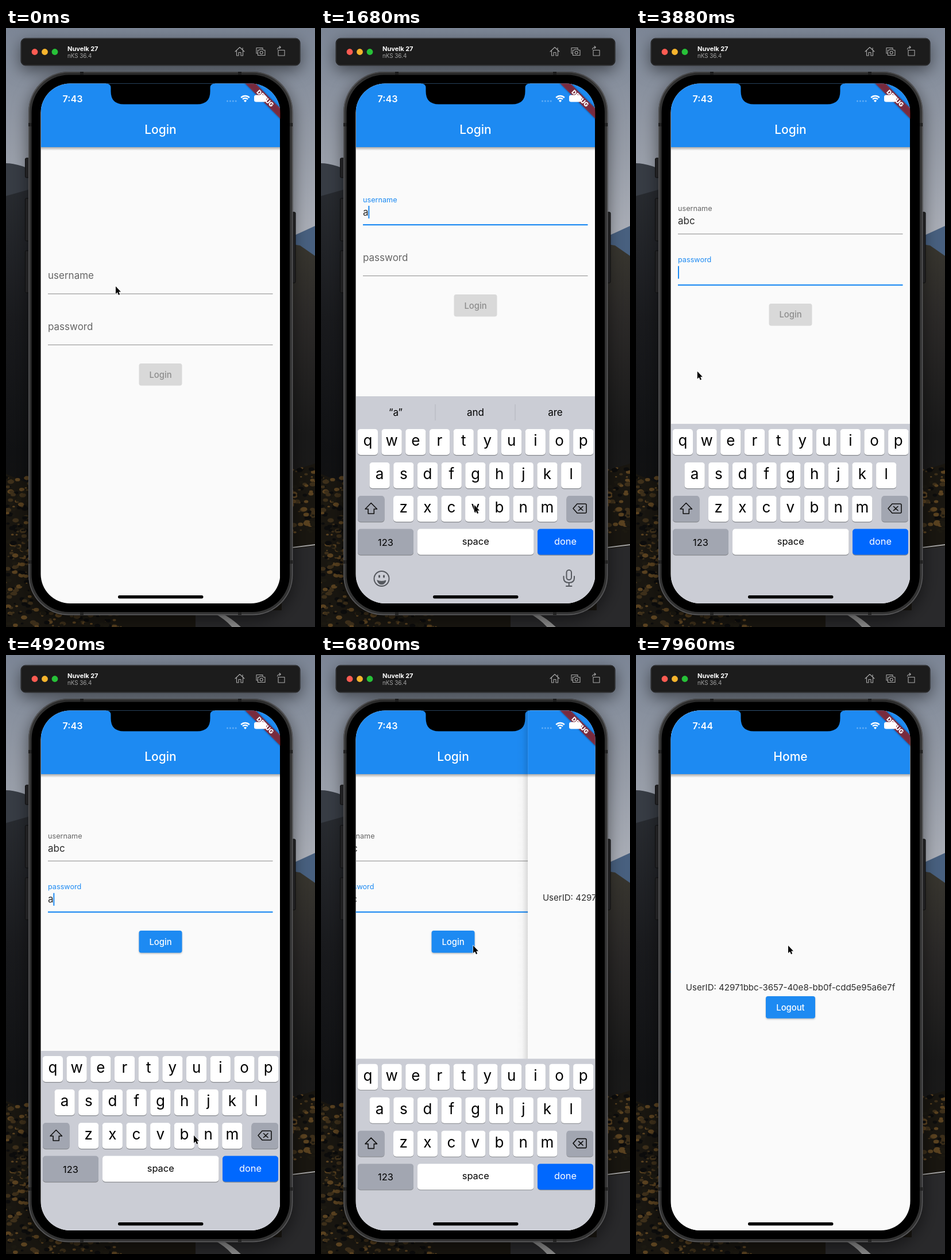
An HTML page that plays this animation: 538 px wide and 1041 px high, repeating every 8 s.

```html
<!DOCTYPE html>
<html lang="en">
<head>
<meta charset="utf-8">
<title>Login flow</title>
<style>
  html, body { margin: 0; width: 100%; height: 100%; overflow: hidden; background: #111; }
  svg { display: block; font-family: Inter, sans-serif; }
  .mid { text-anchor: middle; }
  .line { fill: none; stroke-linecap: round; stroke-linejoin: round; }
  .title { font-size: 21px; font-weight: 500; fill: #fff; }
  .btn { font-size: 14.8px; font-weight: 500; fill: #fff; }
  .key { font-size: 26px; }
  .small { font-size: 16.4px; }
  .body { font-size: 17px; fill: #2b2b2b; }
</style>
</head>
<body>
<svg id="stage" width="538" height="1041" viewBox="0 0 538 1041"></svg>
<script>
const BLUE = '#1d8af2', GREY = '#a2a6b1', LOOP = 8000;
const TAP_USER = 176, TAP_PASS = 3400, PUSH = 6758, KB_CLOSE = 6783;
const userTyping = [[1300, 'a'], [2000, 'ab'], [2560, 'abc']];
const passTyping = [[4500, 'a'], [5180, '•b'], [5840, '••c']];
const hints = [["I", "I’m", "we"], ["“a”", "and", "are"], ["“ab”", "about", "above"], ["“abc”", "ancient", "anchor"]];
// time, x, y of the pointer tip
const pointerPath = [
  [0, 191, 449], [400, 189, 449], [750, 189, 449], [1150, 104, 772], [1380, 104, 772],
  [1680, 267, 829], [1900, 307, 833], [2080, 307, 833], [2420, 230, 833], [2620, 230, 833],
  [3040, 78, 467], [3250, 110, 398], [3480, 110, 398], [4250, 104, 772], [4600, 104, 772],
  [4920, 327, 835], [5050, 310, 834], [5260, 310, 834], [5640, 230, 833], [5900, 230, 833],
  [6300, 265, 505], [LOOP, 265, 505]
];

const rect = (x, y, w, h, r, fill, extra = '') =>
  `<rect x="${x}" y="${y}" width="${w}" height="${h}" rx="${r}" fill="${fill}" ${extra}/>`;
const text = (x, y, cls, str, extra = '') => `<text x="${x}" y="${y}" class="${cls}" ${extra}>${str}</text>`;
const path = (d, extra) => `<path d="${d}" ${extra}/>`;
const fade = (id, stops, dir = 'x2="0" y2="1"') => `<linearGradient id="${id}" ${dir}>` +
  stops.map(([o, c, a = 1]) => `<stop offset="${o}" stop-color="${c}" stop-opacity="${a}"/>`).join('') + '</linearGradient>';

const key = (x, y, w, label, cls = 'key', fill = '#fff', ink = '#000', dy = 29) =>
  rect(x, y + 1.2, w, 45, 5, '#888a8f') + rect(x, y, w, 45, 5, fill) +
  text(x + w / 2, y + dy, cls + ' mid', label, `fill="${ink}"`);
const keyRow = (letters, x, y) => [...letters].map((c, i) => key(x + i * 41.7, y, 35.2, c)).join('');

const appBar = title => rect(61, 207, 416, 6, 0, 'url(#barShade)') + rect(61, 96, 416, 111, 0, BLUE) +
  text(269, 184, 'title mid', title);
const button = (id, x, y, w, label) => `<g id="${id}">` +
  rect(x, y + 1.5, w, 38.5, 4, '#000', 'opacity=".25" filter="url(#soft)"') +
  rect(x, y, w, 38.5, 4, BLUE) + text(x + w / 2, y + 24.5, 'btn mid', label) + '</g>';
const field = (id, y, label) => `<g id="${id}" transform="translate(73 ${y})">
  <text class="label" font-size="17">${label}</text><text class="body value" y="-16.5"></text>
  <rect class="rule" width="391.5"/><rect class="caret" y="-33" width="2" height="22" fill="${BLUE}"/></g>`;

let seed = 7;
const random = () => (seed = seed * 16807 % 2147483647) / 2147483647;
const shrubs = (count, x, y, w, h) => Array.from({ length: count }, () => {
  const size = 1 + random() * 3, tone = ['#3d2f1a', '#0c0c0c', '#5a4220', '#1c1911'][random() * 4 | 0];
  return `<ellipse cx="${x + random() * w}" cy="${y + random() * h}" rx="${size * 1.5}" ry="${size}" fill="${tone}"/>`;
}).join('');

const backdrop = () => rect(0, 0, 538, 1041, 0, 'url(#sky)') +
  path('M538 344L490 366V460H538Z', 'fill="#48607f"') +
  path('M0 235Q24 235 60 254V800H0Z', 'fill="#373c44"') +
  path('M0 292L60 275V1041H0Z', 'fill="url(#hill)"') +
  path('M480 372L512 378L538 396V1041H480Z', 'fill="url(#slope)"') +
  path('M0 775L60 800L480 775L538 757V1041H0Z', 'fill="#191610"') +
  shrubs(170, 0, 780, 46, 220) + shrubs(80, 495, 765, 43, 115) + shrubs(110, 0, 1000, 200, 41) +
  path('M480 908L538 900V1041H330V1012H480Z', 'fill="#29292b"') +
  path('M490 904L538 898', 'stroke="#a5a5a5" stroke-width="2"') +
  path('M348 1010Q380 1024 396 1044H412Q390 1022 364 1012Z', 'fill="#909090"');

const toolbar = () => rect(26, 18, 486, 47, 8, '#1d1d1e', 'stroke="#111" filter="url(#cast)"') +
  rect(26.5, 18.5, 485, 46, 7.5, 'none', 'stroke="#3a3a3b" stroke-width=".8"') +
  ['#fc5b52', '#f6b42d', '#27c138'].map((c, i) => `<circle cx="${50 + i * 17.5}" cy="41.5" r="5.4" fill="${c}"/>`).join('') +
  text(107, 39.5, '', 'Nuvelk 27', 'font-size="11" font-weight="700" fill="#fff"') +
  text(107, 52, '', 'nKS 36.4', 'font-size="9.8" fill="#a4a4a4"') +
  `<g class="line" stroke="#a9a9a9" stroke-width="1.1">
    <path d="M399 41L407 33.5L415 41M401.5 39.5V48H405V42.5H409V48H412.5V39.5M412 37.5V34.5"/>
    <path d="M438 44H436V34.5H447V36M438.5 38.5H441L442 37H447L448 38.5H451V47.5H438.5Z"/><circle cx="444.7" cy="42.8" r="2.5"/>
    <path d="M474 38.5H485V48H474ZM472.5 37Q473 33.5 478 33.5M476 31.5L478.3 33.5L476 35.5"/></g>`;

const phone = () => [[226, 34], [296, 74], [387, 73]].map(([y, h]) => rect(33.5, y, 8, h, 2, '#29292b', 'stroke="#111"')).join('') +
  rect(496, 320, 8, 123, 2, '#29292b', 'stroke="#111"') +
  rect(39, 76, 460.5, 944.5, 70, '#313133', 'filter="url(#cast)"') +
  rect(40, 77, 458.5, 942.5, 69, 'none', 'stroke="#5a5a5c" stroke-width="1.4"') +
  [[129, 76], [404, 76], [129, 1014], [404, 1014], [39, 165], [493, 165], [39, 925], [493, 925]]
    .map(([x, y]) => rect(x, y, 6, 6, 0, '#222')).join('') +
  rect(44.5, 81.5, 449.5, 933.5, 65, '#000');

const banner = () => `<g transform="translate(477 96.5) rotate(45)">` +
  rect(-60, 30, 120, 12.8, 0, '#000', 'opacity=".5" filter="url(#soft)"') +
  rect(-60, 30, 120, 12.8, 0, '#b71c1c', 'opacity=".63"') +
  text(0, 40.3, 'mid', 'DEBUG', 'font-size="10.6" font-weight="900" fill="#fff"') + '</g>';

const status = () => text(98.5, 129, '', '7:43', 'id="clock" font-size="16.2" font-weight="600" fill="#fff"') +
  [0, 1, 2, 3].map(i => `<circle cx="${385.5 + i * 4.9}" cy="127" r="1.5" fill="#fff" opacity=".3"/>`).join('') +
  path('M409.2 121A10.3 10.3 0 0 1 423.8 121M412.1 123.9A6.2 6.2 0 0 1 420.9 123.9', 'fill="none" stroke="#fff" stroke-width="2.5"') +
  path('M416.5 129l-2.6-2.6a3.6 3.6 0 0 1 5.2 0z', 'fill="#fff"') +
  rect(432, 116.5, 21, 12, 3.5, '#fff') + rect(454, 120.5, 1.6, 4.5, .8, '#fff', 'opacity=".6"');

const keyboard = () => `<rect id="kbBack" x="61" width="416" height="400" fill="#cbcdd5"/><g id="kb"><g id="hints">` +
  rect(198.5, 654, 1, 28, 0, '#b3b6bd') + rect(337.5, 654, 1, 28, 0, '#b3b6bd') +
  [130, 269, 408].map(x => text(x, 674, 'mid hint', '', 'font-size="17"')).join('') +
  `<g class="line" stroke="#55585e" stroke-width="2"><circle cx="105.5" cy="957" r="13"/>
    <path d="M98 960Q105.5 963 113 960Q111.5 967 105.5 967Q99.5 967 98 960Z" fill="#55585e" stroke-width="1"/>
    <path d="M101.5 952V954M109.5 952V954" stroke-width="3"/>
    <rect x="427.5" y="942" width="8.5" height="17" rx="4.25"/><path d="M422.5 953V956Q422.5 964 431.75 964T441 956V953M431.75 964V970M427 970H436.5"/></g></g>` +
  keyRow('qwertyuiop', 63.8, 697) + keyRow('asdfghjkl', 84.5, 755) + keyRow('zxcvbnm', 126, 813) +
  key(64, 813, 46.5, '', 'key', GREY) + key(427.5, 813, 46.5, '', 'key', GREY) +
  key(64, 870.5, 97, '123', 'small', GREY) + key(168, 870.5, 202.5, 'space', 'small', '#fff', '#000', 27) +
  key(377, 870.5, 97, 'done', 'small', '#0068fe', '#fff', 27) +
  `<g class="line" stroke="#111" stroke-width="1.6"><path d="M87.2 825.5L97.5 836H92.3V844H82.1V836H77Z"/>
    <path d="M446 827H460Q462 827 462 829V841Q462 843 460 843H446L439 835ZM448.5 831.5L456 838.5M456 831.5L448.5 838.5"/></g></g>`;

const stage = document.getElementById('stage');
stage.innerHTML = `<defs>
  ${fade('sky', [[0, '#7c8696'], [.2, '#969ca7'], [.34, '#a9adb6']])}
  ${fade('hill', [[0, '#282b30'], [.3, '#191a1d'], [.6, '#101113'], [1, '#14120e']])}
  ${fade('slope', [[0, '#38362f'], [.2, '#2b2928'], [.5, '#191919'], [1, '#1c1a18']])}
  ${fade('barShade', [[0, '#000', .32], [1, '#000', 0]])}
  ${fade('edgeShade', [[0, '#000', 0], [.5, '#000', .02], [1, '#000', .13]], 'x2="1" y2="0"')}
  <filter id="soft" x="-20%" y="-50%" width="140%" height="200%"><feGaussianBlur stdDeviation="1.8"/></filter>
  <filter id="cast" x="-20%" y="-60%" width="140%" height="260%"><feDropShadow dx="0" dy="8" stdDeviation="14" flood-opacity=".5"/></filter>
  <clipPath id="screen">${rect(60.5, 96.5, 417, 903.5, 51, '#000')}</clipPath></defs>
  ${backdrop()}${phone()}${toolbar()}
  <g clip-path="url(#screen)">
    <g id="login">${rect(60, 96, 417, 904, 0, '#fafafa')}${appBar('Login')}
      <g id="form">${field('user', 462, 'username')}${field('pass', 550.7, 'password')}${button('submit', 231.5, 583, 75, 'Login')}</g></g>
    <g id="home">${rect(41, 96, 20, 904, 0, 'url(#edgeShade)')}${rect(61, 96, 417, 904, 0, '#fafafa')}${appBar('Home')}
      <g id="info">${text(269, 582.5, 'mid', 'UserID: 42971bbc-3657-40e8-bb0f-cdd5e95a6e7f', 'font-size="15.06" fill="#2b2b2b"')}
      ${button('logout', 226, 593, 86, 'Logout')}</g></g>
    ${banner()}${status()}${keyboard()}
    ${path('M174 90V96.5Q182.5 96.5 182.5 104V110Q182.5 132.5 205 132.5H333Q355.5 132.5 355.5 110V104Q355.5 96.5 364 96.5V90Z', 'fill="#000"')}
    ${rect(195, 986, 148.5, 5.4, 2.7, '#000')}
  </g>
  <g id="pointer">${path('M0 0V13L3 10.3L5 15L7.2 14L5.2 9.6H9Z', 'fill="#000" stroke="#fff" stroke-width="1.2" paint-order="stroke"')}</g>`;

const $ = id => document.getElementById(id);
const clamp = v => Math.min(1, Math.max(0, v));
const smooth = v => v * v * (3 - 2 * v);
const ramp = (t, start, span) => smooth(clamp((t - start) / span));
const mix = (a, b, k) => a + (b - a) * k;
const spring = (t, start) => { const x = Math.max(0, t - start) * .0183; return 1 - (1 + x) * Math.exp(-x); };
const move = (el, x, y) => el.setAttribute('transform', `translate(${x} ${y})`);
const show = (el, on) => el.style.display = on ? '' : 'none';

// Ease-out curve of the page push: cubic-bezier(.35, .91, .33, .97)
function pushEase(v) {
  const bezier = (s, a, b) => 3 * a * s * (1 - s) ** 2 + 3 * b * s * s * (1 - s) + s ** 3;
  let lo = 0, hi = 1;
  for (let i = 0; i < 24; i++) {
    const s = (lo + hi) / 2;
    if (bezier(s, .35, .33) < v) lo = s; else hi = s;
  }
  return bezier(lo, .91, .97);
}

function drawField(id, t, typing, tap, blur) {
  const el = $(id), part = c => el.querySelector('.' + c);
  const typed = typing.filter(([at]) => at <= t).pop();
  const focused = t >= tap && t < blur, float = ramp(t, tap, 200);
  part('label').setAttribute('transform', `translate(0 ${mix(-26, -39.5, float)}) scale(${mix(1, .745, float)})`);
  part('label').setAttribute('fill', focused ? BLUE : '#666');
  part('value').textContent = typed ? typed[1] : '';
  const rule = part('rule'), thick = focused ? 2.2 : 1.1;
  rule.setAttribute('y', -thick / 2);
  rule.setAttribute('height', thick);
  rule.setAttribute('fill', focused ? BLUE : '#939393');
  part('caret').setAttribute('x', typed ? part('value').getComputedTextLength() - .2 : 0);
  show(part('caret'), focused && (t - (typed ? typed[0] : tap)) % 1000 < 500);
}

function draw(t) {
  const raised = 360 * spring(t, TAP_USER) - 48 * spring(t, TAP_PASS);
  const kbHeight = raised - 312 * spring(t, KB_CLOSE);
  const inset = raised - 312 * spring(t, KB_CLOSE + 19);
  const secure = t >= TAP_PASS;

  $('kbBack').setAttribute('y', 1000 - kbHeight);
  move($('kb'), 0, Math.max(0, (secure ? 312 : 360) - kbHeight));
  show($('hints'), !secure);
  const words = hints[userTyping.filter(([at]) => at <= t).length];
  document.querySelectorAll('.hint').forEach((el, i) => el.textContent = words[i]);

  drawField('user', t, userTyping, TAP_USER, TAP_PASS);
  drawField('pass', t, passTyping, TAP_PASS, LOOP);
  move($('form'), 0, -inset / 3);
  move($('info'), 0, -inset / 2);

  const [shade, face, label] = $('submit').children, enabled = t >= passTyping[0][0];
  show(shade, enabled);
  face.setAttribute('fill', enabled ? BLUE : '#d9d9d9');
  label.style.fill = enabled ? '#fff' : '#8c8c8c';

  const push = pushEase(clamp((t - PUSH) / 400));
  move($('login'), -416 / 3 * push, 0);
  move($('home'), 416 * (1 - push), 0);
  show($('home'), t > PUSH);
  $('clock').textContent = t < 7700 ? '7:43' : '7:44';

  const next = pointerPath.findIndex(p => p[0] > t), a = pointerPath[next - 1], b = pointerPath[next];
  const k = ramp(t, a[0], b[0] - a[0]);
  move($('pointer'), mix(a[1], b[1], k), mix(a[2], b[2], k));
}

const start = performance.now();
function tick() {
  draw((performance.now() - start) % LOOP);
  requestAnimationFrame(tick);
}
tick();
</script>
</body>
</html>
```
